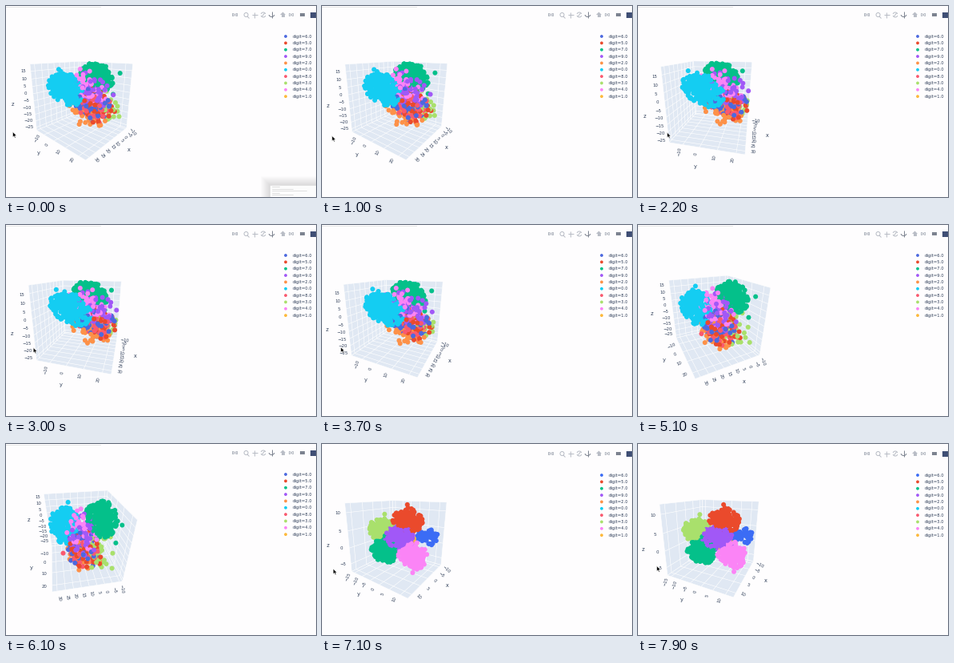
Write a matplotlib script that moves like this. It is 388 px wide and 239 px high and loops after 8 s.

```python
import numpy as np
import matplotlib.pyplot as plt
from matplotlib.animation import FuncAnimation
from matplotlib.collections import LineCollection
from matplotlib.patches import Arc, Circle, Polygon, Rectangle

W, H, DPI = 388, 239, 64
FRAMES, STEP, CUT = 80, 100, 6800
PT = 72 / DPI
FOCAL, DIST, CX, CY = 184, 2.165, 95.5, 116
INK = "#33425c"

plt.rcParams["font.family"] = "DejaVu Sans"
fig = plt.figure(figsize=(W / DPI, H / DPI), dpi=DPI, facecolor="#fefdfe")
ax = fig.add_axes([0, 0, 1, 1])
ax.axis("off")

COLORS = {6: "#4c69df", 5: "#ea4a2c", 7: "#04c08a", 9: "#a158f7", 2: "#fd9148",
          0: "#14cdf2", 8: "#f9596f", 3: "#a9e06c", 4: "#fb84f6", 1: "#fdb93b"}


class Scene:
    """One recorded view: clusters, axis ticks and camera path."""

    def __init__(self, centres, big, small, slope, axes, keys, shift, blue):
        self.axes, self.shift = axes, shift
        self.colors = {**COLORS, 6: blue}
        rng = np.random.default_rng(7)
        pts, colors = [], []
        for digit, centre in centres.items():
            n, radius = big if digit in BIG[shift] else small
            d = rng.normal(size=(n, 3))
            d *= radius * (rng.random(n) ** .45 / np.linalg.norm(d, axis=1))[:, None]
            d[rng.random(n) < .02] *= 1.6  # a few stragglers
            d[:, 1] *= 1.35
            d[:, 2] += slope * d[:, 1]
            pts.append(d + centre)
            colors += [self.colors[digit]] * n
        self.pts = np.clip(np.vstack(pts), -.48, .48)
        self.dots = np.array(colors)
        keys = np.array(keys, float)
        self.t, self.v = keys[:, 0], keys[:, 1:]
        self.slope = np.gradient(self.v, self.t, axis=0)

    def pose(self, t):
        """Azimuth and elevation on a smooth curve through the keys."""
        i = int(np.clip(np.searchsorted(self.t, t, "right") - 1, 0, len(self.t) - 2))
        h = self.t[i + 1] - self.t[i]
        s = (t - self.t[i]) / h
        ease = s * s * (3 - 2 * s)
        bend = h * s * (1 - s) * ((1 - s) * self.slope[i] - s * self.slope[i + 1])
        return self.v[i] + ease * (self.v[i + 1] - self.v[i]) + bend


BIG = [{0, 7}, {5, 7, 9, 4, 3}]
SCENES = [
    Scene({0: (.24, -.09, .19), 7: (-.25, .06, .31), 9: (0, .18, .16), 4: (.03, .10, .2),
           5: (0, .25, -.04), 2: (.05, .12, -.14), 3: (-.17, .2, -.05),
           6: (.02, .2, -.02), 8: (0, .18, -.02)},
          (300, .21), (55, .23), -.25,
          [(-12, 33, range(-10, 31, 5)), (-18.5, 24.5, range(-10, 21, 10)),
           (-27.5, 19.5, range(-25, 16, 5))],
          [(0, 42, 17), (1000, 38, 17), (2200, 14, 18), (3700, 27, 18),
           (5100, 64, 25), (6100, 80, 35), (CUT, 76, 34)], 0, COLORS[6]),
    Scene({5: (0, .16, .27), 7: (.2, -.10, -.17), 9: (.1, .1, .03), 4: (.15, .36, -.15),
           3: (.08, -.25, .1), 6: (-.22, .37, .02), 1: (-.1, .1, -.1)},
          (200, .17), (50, .12), 0,
          [(-12, 12, range(-10, 11, 5)), (-17, 13, range(-15, 11, 5)),
           (-7.5, 12.5, range(-5, 11, 5))],
          [(CUT, 40, 16), (7900, 27, 18)], 1, "#3b6cf5"),
]


def project(p, az, el, shift):
    p = np.atleast_2d(p)
    a, e = np.radians([az, el])
    right = p[:, 1] * np.cos(a) - p[:, 0] * np.sin(a)
    near = p[:, 0] * np.cos(a) + p[:, 1] * np.sin(a)
    up = p[:, 2] * np.cos(e) - near * np.sin(e)
    depth = DIST - near * np.cos(e) - p[:, 2] * np.sin(e)
    xy = np.column_stack([CX + FOCAL * right / depth, CY + shift - FOCAL * up / depth])
    return xy, depth


def label(xy, s, size, rot=0, ha="center"):
    ax.text(*xy, s, fontsize=size * PT, color=INK, rotation=rot, ha=ha,
            va="center", zorder=6)


def draw_box(scene, view):
    def flat(*p):
        return project(p, *view)[0]

    def on_axis(k, value):
        lo, hi, _ = scene.axes[k]
        return (value - lo) / (hi - lo) - .5

    # each wall is fixed at the low end of one axis
    grid = []
    for fixed in range(3):
        u, v = [k for k in range(3) if k != fixed]
        corners = np.full((4, 3), -.5)
        corners[[1, 2], u] = corners[[2, 3], v] = .5
        ax.add_patch(Polygon(flat(*corners), fc="#e0e8f3", ec="white", lw=.5 * PT, zorder=1))
        for run, across in ((u, v), (v, u)):
            for tick in scene.axes[run][2]:
                seg = np.full((2, 3), -.5)
                seg[:, run] = on_axis(run, tick)
                seg[1, across] = .5
                grid.append(flat(*seg))
    ax.add_collection(LineCollection(grid, colors="white", linewidths=.6 * PT, zorder=2))

    # midpoint of each labelled edge and its outward direction
    edges = [((0, .5, -.5), (0, 1, 0)), ((.5, 0, -.5), (1, 0, 0)), ((.5, -.5, 0), (.5, -.5, 0))]
    for k, (base, out) in enumerate(edges):
        base, out, half = np.array(base), np.array(out), np.eye(3)[k] / 2
        start, mid, end = flat(base - half, base, base + half)
        inner, outer = flat(base - out / 2, base)
        away = (outer - inner) / np.hypot(*(outer - inner))
        dx, dy = end - start
        rot = 0 if k == 2 else (np.degrees(np.arctan2(dx, dy)) + 90) % 180 - 90
        for tick in scene.axes[k][2]:
            p = base + 2 * half * on_axis(k, tick)
            label(flat(p)[0] + away * 9.5, str(tick).replace("-", "\u2212"), 5.4, rot)
        # seen from high above, the x title falls outside the view
        if k or view[1] < 30:
            label(mid + away * 26 + (0, 6 * (k == 2)), "xyz"[k], 6.6)


def draw_points(scene, view):
    xy, depth = project(scene.pts, *view)
    order = np.argsort(-depth)
    ax.scatter(*xy[order].T, s=(6 * PT) ** 2, c=scene.dots[order], linewidths=0, zorder=4)


def draw_legend(scene):
    for i, (digit, color) in enumerate(scene.colors.items()):
        y = 38 + scene.shift + i * 8.35
        ax.add_patch(Circle((350, y), 1.9, fc=color, lw=0))
        label((359, y), f"digit={digit}.0", 5.3, ha="left")


def draw_toolbar(y):
    grey, dark = "#b9bdc6", "#7d8390"

    def line(x0, y0, x1, y1, c=grey):
        ax.plot([x0, x1], [y + y0, y + y1], color=c, lw=PT, solid_capstyle="butt")

    def block(x, w, h, c=grey):
        ax.add_patch(Rectangle((x - w / 2, y - h / 2), w, h, fc=c, lw=0))

    def arc(x, w, h, a, b, c=grey):
        ax.add_patch(Arc((x, y), w, h, theta1=a, theta2=b, ec=c, lw=PT))

    for x in (286.5, 357):  # cameras
        block(x, 6.5, 4.8)
        ax.add_patch(Circle((x, y), 1.5, fc=grey, ec="white", lw=.7 * PT))
    arc(300.5, 5, 5, 0, 360)
    line(302, 2, 304.5, 4.5)
    line(307.5, 0, 314.5, 0)
    line(311, -3.5, 311, 3.5)
    for turn in (20, 200):
        arc(322, 6, 6, turn, turn + 140)
    line(320.5, 2, 323.5, -2)
    line(332.5, -4, 332.5, 3.5, dark)
    arc(332.5, 6.5, 5, 0, 180, dark)
    ax.add_patch(Polygon([(343, y), (346.5, y - 3.5), (350, y)], fc=grey, lw=0))
    ax.add_patch(Rectangle((344.5, y), 4, 3, fc=grey, lw=0))
    block(371, 6.5, 4, dark)
    block(384.7, 6.6, 7, "#3f4f75")


def draw_preview(t):
    x, y = 330 + 70 * (t / 800) ** 2, 224
    if x > W + 12:
        return
    for g in range(12):
        ax.add_patch(Rectangle((x - g, y - g), 80, 40, fc="black", alpha=.011, lw=0))
    ax.add_patch(Rectangle((x, y), 80, 40, fc="#fcfcfc", ec="#d8d8d8", lw=.5 * PT))
    for row in range(5):
        ax.plot([x + 3, x + 12 + 17 * (row % 3)], [y + 2 + 2.6 * row] * 2,
                color="#cdcdcd", lw=.6 * PT)


def draw_cursor(x, y):
    arrow = np.array([(0, 0), (0, 6.6), (1.5, 5.2), (2.6, 7.6), (3.7, 7.1),
                      (2.7, 4.8), (4.6, 4.7)])
    ax.add_patch(Polygon(arrow + (x, y), fc="black", ec="white", lw=.5 * PT, zorder=9))


def draw(i):
    t = i * STEP
    ax.clear()
    ax.axis("off")
    scene = SCENES[int(t >= CUT)]
    az, el = scene.pose(t)
    view = (az, el, scene.shift)
    if not scene.shift:
        ax.plot([0, 118], [.5, .5], color="#e8e8e8", lw=PT)
    draw_box(scene, view)
    draw_points(scene, view)
    draw_legend(scene)
    draw_toolbar(11 + scene.shift)
    draw_preview(t)
    # dragging left turns the box, so the cursor follows the azimuth
    if az < 56:
        draw_cursor(50.5 - az, 157.5 + 5 * np.sin(2 * np.pi * t / 4600))
    ax.set(xlim=(0, W), ylim=(H, 0))
    return []


anim = FuncAnimation(fig, draw, frames=FRAMES, interval=STEP, init_func=lambda: [],
                     repeat=True, repeat_delay=0, blit=False)
plt.show()
```
